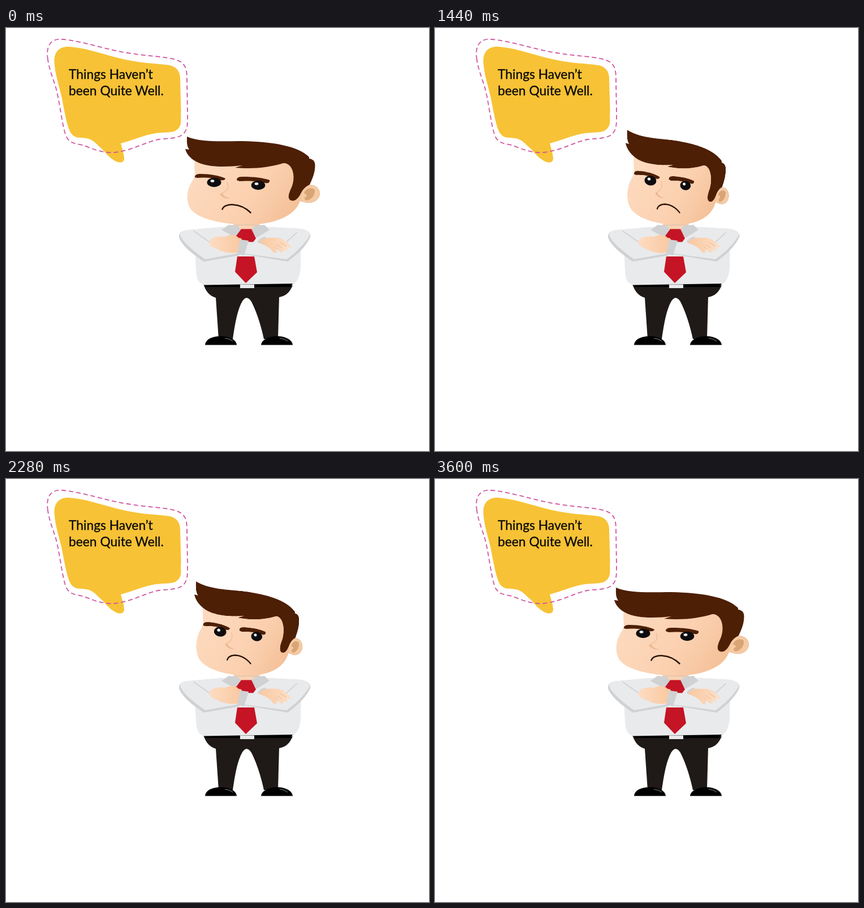
An HTML page that plays this animation: 748x748 px, repeating every 3.63 s.

```html
<!DOCTYPE html>
<html lang="en">
<head>
<meta charset="utf-8">
<title>Grumpy man</title>
<style>
  html, body { margin: 0; width: 100%; height: 100%; overflow: hidden; background: #fff; }
  #stage {
    position: relative; width: 748px; height: 748px; overflow: hidden;
    perspective: 1000px; perspective-origin: 433px 345px;
  }
  svg { position: absolute; left: 0; top: 0; }
  #head { transform-origin: 433px 345px; }
  text {
    font-family: Lato, "Open Sans", sans-serif; font-size: 22.8px;
    fill: #0d0b08; stroke: #0d0b08; stroke-width: .35px;
  }
</style>
</head>
<body>
<div id="stage">
  <svg width="748" height="748" viewBox="0 0 748 748">
    <defs>
      <linearGradient id="fist"><stop offset="0" stop-color="#fddcc2"/><stop offset="1" stop-color="#f9c8a0"/></linearGradient>
      <linearGradient id="palm"><stop offset="0" stop-color="#f8c7a0"/><stop offset="1" stop-color="#fde0c8"/></linearGradient>
    </defs>

    <!-- speech bubble -->
    <path fill="#f7c235" d="M86 66C83 45 92 32 112 33C150 36 185 52 222 58C250 63 270 63 290 66C302 69 308 77 308 90L309.500 148C308 160 313 172 302 180C295 186 280 184 265 186C245 189 225 198 203 204C205 212 208 220 209 230C209 237 204 239 197 237C185 232 178 223 170 214C160 206 155 197 142 195C130 193 122 196 115 186C108 175 104 150 98 120C92 95 88 85 86 66Z"/>
    <path fill="none" stroke="#d0559f" stroke-width="1.8" stroke-dasharray="8 5" d="M74 56C70 30 80 18 100 20C140 24 175 38 215 44C250 50 280 50 300 56C316 61 320 70 320 90L321 150C321 170 322 182 310 190C300 196 285 195 270 197C245 202 225 216 192 220C170 222 150 212 135 207C120 204 110 203 105 188C98 165 95 130 88 105C82 85 77 75 74 56Z"/>
    <text x="111" y="90">Things Haven’t</text>
    <text x="111" y="119">been Quite Well.</text>

    <!-- trousers and shoes -->
    <path fill="#1f1a17" d="M350 455H507C502 467 495 474 483 476L481 550H456C452 530 443 501 434 484Q426 471 418 483C408 500 404 530 401 550H376L371 477C360 474 353 465 350 455Z"/>
    <path d="M352 560.500C353 550 365 545 380 545C395 545 407 551 408 560.500Z"/>
    <path d="M451 560.500C452 551 465 545 479 545C494 545 506 551 507 560.500Z"/>
    <path fill="none" stroke="#55585a" stroke-width="1.3" d="M387 549Q395 549 401 554M484 549Q492 549 498 554"/>

    <!-- torso -->
    <path fill="#e9eaec" d="M334 385L336 430C337 445 341 452 350 454H507C516 448 521 438 521 420L522 380L465 352H383Z"/>
    <path d="M349 454.500L507 452L503 458H353Z"/>
    <path fill="#e9eaec" d="M414 453.500H439V460H414Z"/>
    <path fill="#fbd3b2" d="M402 346H449L440 357H411Z"/>
    <path stroke="#cdbfb4" d="M402 348.5H449"/>

    <!-- upper arms -->
    <path fill="#d0d1d3" d="M383 352L324 357C311 358 305 362 306 370C309 381 325 397 350 413L413 402V385Z"/>
    <path fill="#e9eaec" d="M383 352L324 357C313 358 307 361 308 367C314 380 331 394 352 409L413 398V375Z"/>
    <path fill="#d0d1d3" d="M465 352L520 355C533 357 540 362 538 370C532 383 520 397 498 413L420 400V380Z"/>
    <path fill="#e9eaec" d="M465 352L520 355C532 357 538 361 537 367C529 380 517 394 496 409L420 397V378Z"/>
    <path fill="none" stroke="#d0d1d3" stroke-width="1.6" d="M332 359L362 380M515 361L491 383"/>

    <!-- collar and tie -->
    <path fill="#d0d1d3" d="M394 348L410 350L416 357L405 370L381 357ZM457 348L440 350L433 357L443 371L466 357Z"/>
    <path fill="#c41425" d="M416 355.500H434L442 372L436 380L412 376L406 369ZM409 404H439L444 432L424 451L405 431Z"/>

    <!-- hands and cuffs -->
    <path fill="url(#fist)" d="M360 377C362 370 374 367 388 369C397 364 407 366 411 371C418 371 419 375 413 379L411 397C396 399 384 397 374 391C364 388 358 383 360 377Z"/>
    <path fill="#e9eaec" d="M424 378L452 379L466 395L498 402L497 409L421 399Z"/>
    <path fill="#d0d1d3" d="M414 374L429 376L421 402L409 399Z"/>
    <path fill="none" stroke="#d0d1d3" stroke-width="3" d="M446 379Q450 371 460 371"/>
    <path fill="url(#palm)" d="M447 380C451 373 461 370 472 371C482 370 491 373 497 379L505 387C504 390 500 389 496 386L498 392C496 396 492 394 488 389L491 395C489 399 484 397 480 391L478 397C474 400 472 396 468 391C461 385 454 382 447 380Z"/>
    <path fill="none" stroke="#eab890" d="M484 379L496 386M479 383L488 389M475 386L480 391"/>
  </svg>

  <svg id="head" width="748" height="748" viewBox="0 0 748 748">
    <defs>
      <linearGradient id="skin" x1="0" y1=".3" x2="1" y2=".7">
        <stop offset="0" stop-color="#fddabf"/><stop offset=".6" stop-color="#fbd0af"/><stop offset="1" stop-color="#f3bf96"/>
      </linearGradient>
    </defs>
    <path fill="#f6caa3" stroke="#dfb48f" stroke-width=".8" d="M522 286C527 279 536 276 545 279C553 282 556 290 554 297C551 306 540 311 529 308L518 305Z"/>
    <path fill="#d8a577" d="M527 293C528 285 540 280 546 286C547 295 541 303 532 305C527 304 526 300 532 297C531 293 529 293 527 293Z"/>
    <path fill="url(#skin)" d="M334 230C331 250 337 257 331 268C319 285 318 304 325 318C337 338 385 348 430 348C470 347 510 335 520 306L526 280L512 235L480 225Z"/>
    <path fill="#4d1f05" d="M320 192C345 203 385 200 418 200C470 201 515 208 536 228V231C545 232 547 238 546.500 245C546 258 541 268 537 277C530 280 525 285 521 293C516 303 510 307 504 305C497 302 500 292 505 282C510 270 510 254 503 245C498 239 492 238 487 240C465 246 440 250 405 247L418 243C390 246 355 247 336 236C325 230 319 222 317 214L324 215C319 208 320 200 320 192Z"/>
    <path fill="#4d1f05" d="M334 264C334 259 338 258 345 258C360 258 378 261 388 266C387 270 382 270 375 268C362 264 348 264 338 265ZM408 269C408 264 412 263 420 263C438 263 455 265 466 269C467 273 464 275 458 274C445 270 425 270 413 271Z"/>
    <g fill="#0d0c0e">
      <ellipse cx="368" cy="273" rx="12.500" ry="8.200"/>
      <ellipse cx="446" cy="278" rx="12.300" ry="8.200"/>
    </g>
    <g fill="#fff" stroke="#555" stroke-width="1">
      <ellipse cx="365" cy="270.500" rx="3.500" ry="2.600"/>
      <ellipse cx="443" cy="275.500" rx="3.500" ry="2.600"/>
    </g>
    <path fill="none" stroke="#edba93" stroke-width="1.300" d="M391 273C395 282 391 288 384 291L379 294"/>
    <path fill="#edba93" d="M378 294L383 292C384 297 389 300 398 301C389 303 382 300 378 294Z"/>
    <path fill="none" stroke="#2b1206" stroke-width="2.500" stroke-linecap="round" d="M382.500 320.500C386 309.500 414 308 432.500 326.500"/>
  </svg>
</div>
<script>
  const LOOP = 3630, STEP = 30, HALF = 1800, TURN = 50;
  const head = document.getElementById("head");

  // The head turns away at a steady rate, then back again.
  function draw(ms) {
    const t = Math.floor((ms % LOOP) / STEP) * STEP;
    const angle = TURN * (1 - Math.abs(t - HALF) / HALF);
    head.style.transform = `rotateY(${angle}deg)`;
  }

  function tick() {
    draw(performance.now());
    requestAnimationFrame(tick);
  }
  tick();
</script>
</body>
</html>
```
